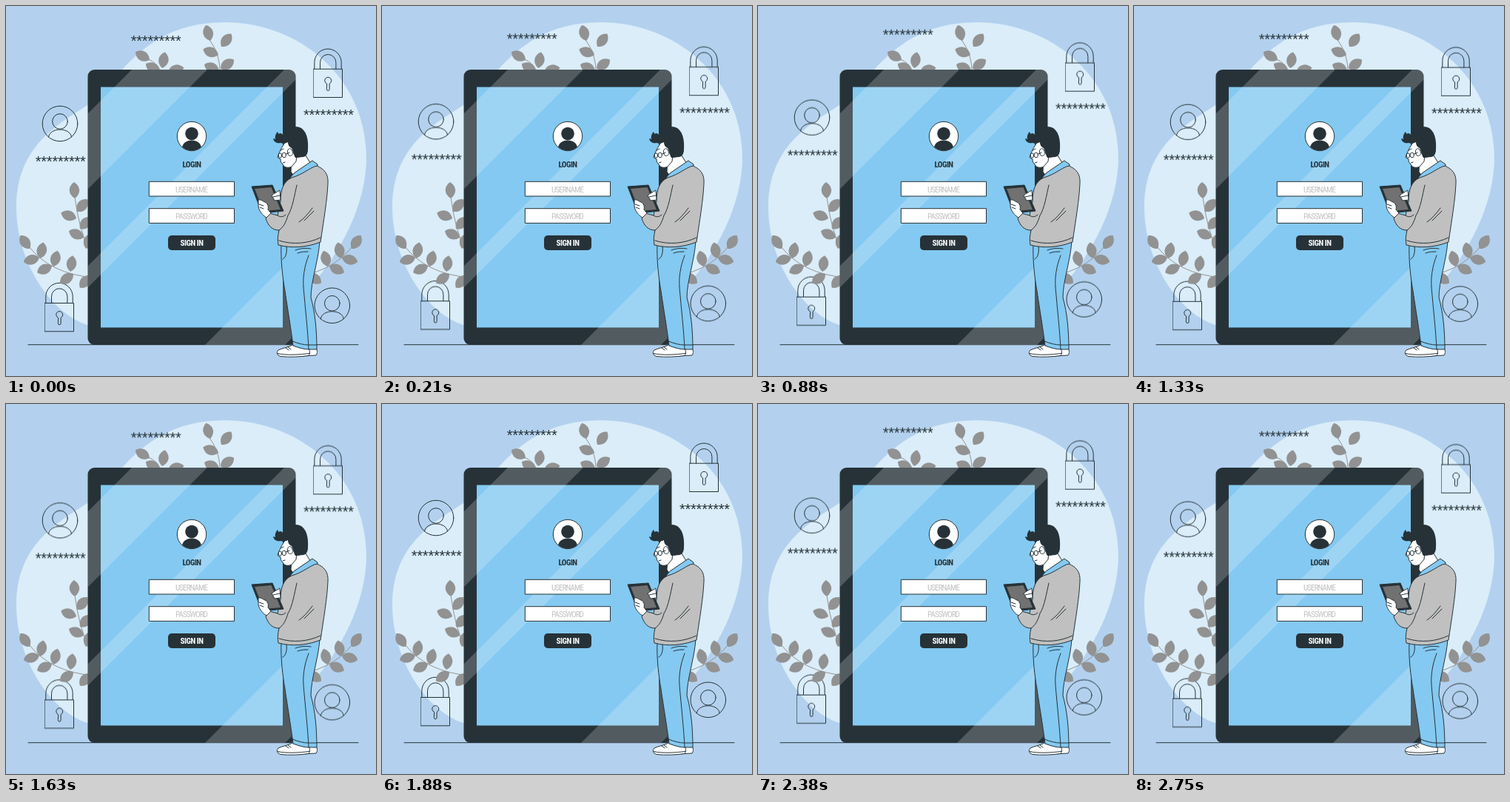
An HTML page without scripts that plays this animation: 500x500 px, repeating every 2.79 s.

```html
<!DOCTYPE html>
<html lang="en">
<head>
<meta charset="utf-8">
<title>Login</title>
<style>
html, body { margin: 0; width: 100%; height: 100%; overflow: hidden; background: #b3d1ee; }
svg { display: block; width: 100%; height: 100%; }
text { font-family: "Roboto Condensed", Roboto, "Open Sans", sans-serif; font-size: 11px; font-stretch: 75%; text-anchor: middle; }
.bold { font-weight: 700; letter-spacing: -.5px; }
.hint { fill: #c2c2c2; letter-spacing: -.9px; }
.stars text { font: 20px "Liberation Sans", Arial, sans-serif; letter-spacing: -.25px; text-anchor: start; fill: #263238; }
.line { fill: none; stroke: #263238; stroke-width: 1; stroke-linecap: round; stroke-linejoin: round; }
.float .line { stroke-width: 1.150; }
.shape { stroke: #263238; stroke-width: 1; stroke-linejoin: round; }
.dark { fill: #263238; }
.skin { fill: #fff; }
.leaves { fill: #929292; }
.stem { fill: none; stroke: #929292; stroke-width: 1; }
/* rise and fall at 24 steps a second, cut short by the loop */
.float { animation: float 2790ms -4ms infinite steps(18); }
@keyframes float {
  0% { transform: translateY(0); }
  26.882% { transform: translateY(-10px); }
  53.763% { transform: translateY(0); }
  80.645% { transform: translateY(-10px); animation-timing-function: steps(13); }
  100% { transform: translateY(-2.8px); }
}
</style>
</head>
<body>
<svg viewBox="0 0 500 500">
  <defs>
    <path id="leaf" d="M0 0C-9-6-9-16 0-22C9-16 9-6 0 0Z"/>
    <g id="lock" class="line">
      <path d="M415.5 85.2h39v38.3h-39z"/>
      <path d="M416.800 85V76.500a18.200 18.500 0 0 1 36.400 0V85M424.500 85V76.500a10.700 11 0 0 1 21.400 0V85"/>
      <path d="M433.300 104.900a4.500 4.500 0 1 1 3.800 0V112.500a1.900 1.900 0 0 1-3.800 0Z"/>
    </g>
    <g id="user" class="line">
      <circle r="23.800"/>
      <circle cy="-3" r="10.300"/>
      <path d="M-15.500 18C-14 4.500 14 4.500 15.500 18"/>
    </g>
    <g id="branch">
      <path class="stem" d="M118 367Q60 362 31 325"/>
      <use href="#leaf" transform="translate(32 328)rotate(-35)"/>
      <use href="#leaf" transform="translate(46 341)rotate(12)"/>
      <use href="#leaf" transform="translate(45 340)rotate(-105)"/>
      <use href="#leaf" transform="translate(64 352)rotate(15)"/>
      <use href="#leaf" transform="translate(62 351)rotate(-115)"/>
      <use href="#leaf" transform="translate(87 359)rotate(8)"/>
      <use href="#leaf" transform="translate(91 362)rotate(-125)"/>
      <use href="#leaf" transform="translate(114 364)rotate(-140)"/>
    </g>
    <clipPath id="device"><rect x="110.500" y="86" width="281" height="372" rx="9"/></clipPath>
    <clipPath id="badge"><circle cx="251" cy="176" r="19.500"/></clipPath>
  </defs>

  <rect width="500" height="500" fill="#b3d1ee"/>
  <path fill="#daedf9" d="M295 22C400 22 487 100 487 205C487 270 450 335 415 375C360 435 180 455 110 431C60 415 14 345 14 272C14 190 70 160 110 134C127 122 140 105 157 86C185 55 225 22 295 22Z"/>

  <g class="float">
    <use href="#lock"/>
    <use href="#lock" x="-363" y="316.300"/>
    <use href="#user" x="73" y="159"/>
    <use href="#user" x="440.800" y="404.800"/>
    <g class="stars">
      <text x="168.800" y="54.400">*********</text>
      <text x="39.800" y="217.300">*********</text>
      <text x="402" y="154.200">*********</text>
    </g>
  </g>

  <g class="leaves">
    <path class="stem" d="M289 90Q290 66 274 44M212 95Q206 76 190 71M114 335Q98 300 93 258"/>
    <use href="#branch"/>
    <use href="#branch" transform="translate(499 0)scale(-1 1)"/>
    <!-- top -->
    <use href="#leaf" transform="translate(276 47)rotate(-15)"/>
    <use href="#leaf" transform="translate(291 55)rotate(38)"/>
    <use href="#leaf" transform="translate(287 66)rotate(-70)"/>
    <use href="#leaf" transform="translate(290 85)rotate(55)"/>
    <use href="#leaf" transform="translate(288 88)rotate(-65)"/>
    <use href="#leaf" transform="translate(194 73)rotate(-60)"/>
    <use href="#leaf" transform="translate(211 84)rotate(10)"/>
    <use href="#leaf" transform="translate(208 89)rotate(-60)"/>
    <use href="#leaf" transform="translate(219 89)rotate(75)"/>
    <!-- left -->
    <use href="#leaf" transform="translate(93 260)rotate(-3)"/>
    <use href="#leaf" transform="translate(96 278)rotate(40)"/>
    <use href="#leaf" transform="translate(95 287)rotate(-70)"/>
    <use href="#leaf" transform="translate(100 301)rotate(45)"/>
    <use href="#leaf" transform="translate(105 313)rotate(-65)"/>
    <use href="#leaf" transform="translate(108 328)rotate(20)"/>
  </g>

  <path class="line" d="M30 457.700H476"/>

  <!-- big tablet -->
  <g clip-path="url(#device)">
    <path class="dark" d="M110 86h282v373h-282z"/>
    <path fill="#84c9f1" d="M128 109.500h246v325h-246z"/>
    <path fill="#fff" opacity=".2" d="M256 0L0 256V358L358 0ZM462 0L0 462V491L491 0ZM727 0L227 500H335L835 0Z"/>
  </g>
  <circle class="shape" cx="251" cy="176" r="19.700" fill="#fff"/>
  <g class="dark" clip-path="url(#badge)">
    <circle cx="251" cy="172.500" r="8.800"/>
    <ellipse cx="251" cy="192" rx="13" ry="10.500"/>
  </g>
  <text class="bold dark" x="251" y="218.300">LOGIN</text>
  <path class="shape" fill="#fff" d="M193.300 237.300h115.200v19.700h-115.200zM193.300 273.700h115.200v19.700h-115.200z"/>
  <text class="hint" x="250.500" y="251.500">USERNAME</text>
  <text class="hint" x="250.500" y="287.700">PASSWORD</text>
  <rect class="dark" x="219" y="310" width="64" height="20" rx="5"/>
  <text class="bold" x="251" y="324" fill="#fff">SIGN IN</text>

  <!-- man -->
  <g>
    <path class="shape skin" d="M409 464L419 462C421 466 421 469 419 472L400 473Z"/>
    <path class="shape skin" d="M389 457C383 461 374 462 368 465C365 468 366 472 371 473.500C383 475 398 474 409 472.500C411 470 411 466 409 463Z"/>
    <path class="line" d="M366.500 469.500C380 472.500 396 471 410 469.500M381 461l4 3M378 462l4 3"/>
    <path class="shape" fill="#84c9f1" d="M372 320C371 345 374 368 377 385C379 400 385 435 388 459C396 462 403 464 409 464H420C420 440 418 415 412 394C412 372 422 345 424 318Z"/>
    <path class="line" d="M409 337C403 352 401 368 402 380C404 405 408 440 409 464M391 330C398 327 406 327 412 328M394 334C399 332 404 332 408 332M379 325C380 334 378 340 374 342M387 453C395 456 402 458 408 458M409 458H420"/>

    <path class="shape skin" d="M386 206L405 202L411 212L390 231L385 224Z"/>
    <path class="shape skin" d="M379 182C374 188 371 194 367 204C368 206 370 206 371 207C371 210 372 213 374 214C376 219 382 219 386 217L392 210L394 190Z"/>
    <path class="dark" d="M371 185C366 186 362 184 361 179L364 180C363 176 365 172 367 170L368.500 173C370 171 373 172 374 174C377 165 388 161 397 164C406 168 409 180 408 194C408 199 406 203 402 204L391 205C389 202 388 196 386 192C382 190 381 187 381 184C377 186 374 186 371 185Z"/>
    <path class="shape skin" d="M386 194C382 190 379 196 381 200C382 204 387 203 388 199Z"/>
    <g class="line">
      <ellipse cx="370.300" cy="202" rx="2.200" ry="3.200"/>
      <ellipse cx="375.800" cy="201.500" rx="2.700" ry="3.300"/>
      <path d="M378.500 200L383 198M371 195l4-2M374 212l3-1"/>
    </g>

    <path class="shape" fill="#84c9f1" d="M384 232L389 226L414 209L421 214L420 222L390 236Z"/>
    <path class="shape" fill="#c0c0c0" d="M386 232C375 237 371 248 371 264L367 283L356 280L351 287C354 297 360 303 369 303C367 311 367 317 368 323C387 328 407 326 425 319C429 291 434 263 435 240C436 227 430 220 420 216C411 218 401 228 386 232Z"/>
    <path class="line" d="M393 242C390 255 387 274 381 283C378 293 375 299 369 303M367 283C371 286 375 285 378 282M369 317C388 323 408 321 425 313M396 292C403 287 409 280 414 273M403 290L416 277"/>

    <path class="shape dark" d="M332 244L360 242L375 277L346 280Z"/>
    <path fill="#717171" d="M336 247L358.500 245L371 275L348 277Z"/>
    <path class="shape skin" d="M359 256C362 253 367 251 370 249L371 262L363 263Z"/>
    <path class="line" d="M361 258L370 256"/>
    <path class="shape skin" d="M341 262C344 261 347 264 350 265C354 267 355 271 354 275L358 280L352 286C347 283 342 277 341 271Z"/>
    <path class="line" d="M342 268l6 2M343 272l5 2"/>
  </g>
</svg>
</body>
</html>
```
